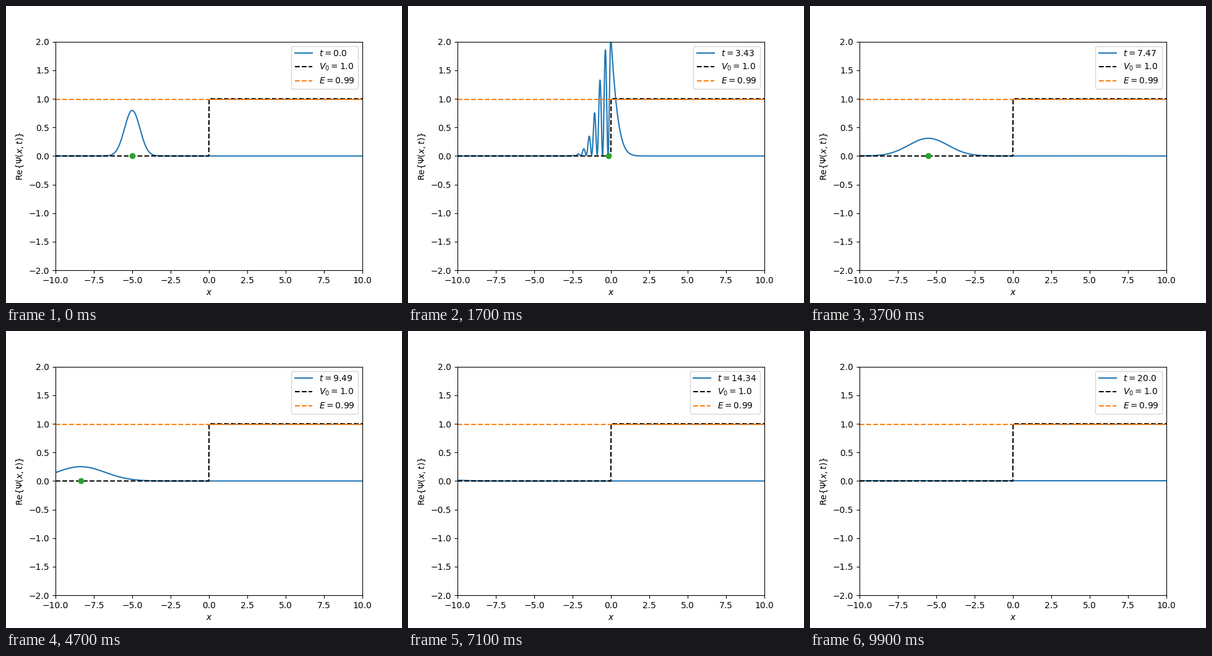
Write a matplotlib script that moves like this. It is 640 px wide and 480 px high and loops after 10000 ms.

```python
import numpy as np
import matplotlib.pyplot as plt
from matplotlib.animation import FuncAnimation

FRAMES = 100
HBAR = 1 / (2 * np.pi)
MASS = 1.0
V0, E = 1.0, 0.99
X0, SIGMA = -5.0, 0.5

speed = np.sqrt(2 * E / MASS)
k = np.sqrt(2 * MASS * E) / HBAR
kappa = np.sqrt(2 * MASS * (V0 - E)) / HBAR
R = (k - 1j * kappa) / (k + 1j * kappa)
T = 2 * k / (k + 1j * kappa)

x = np.linspace(-10, 10, 1000)
times = np.linspace(0, 20, FRAMES)


def envelope(x, t):
    """Amplitude of a free, spreading Gaussian packet."""
    s = SIGMA * np.sqrt(1 + (HBAR * t / (2 * MASS * SIGMA**2)) ** 2)
    d = x - X0 - speed * t
    return np.exp(-(d / (2 * s)) ** 2) / np.sqrt(s * np.sqrt(2 * np.pi))


def density(t):
    incoming = envelope(x, t) * np.exp(1j * k * x)
    reflected = R * envelope(-x, t) * np.exp(-1j * k * x)
    inside = T * envelope(x, t) * np.exp(-kappa * np.maximum(x, 0))
    return np.abs(np.where(x < 0, incoming + reflected, inside)) ** 2


def time_label(t):
    return f"$t={round(float(t), 2)}$"


fig, ax = plt.subplots(figsize=(6.4, 4.8), dpi=100)
wave, = ax.plot(x, density(0), label=time_label(0.0))
ax.plot(x, np.where(x < 0, 0, V0), "k--", label=f"$V_0={V0}$")
ax.plot(x, np.full_like(x, E), "--", color="C1", label=f"$E={E}$")
particle, = ax.plot([X0], [0], "o", color="C2")
ax.set_xlim(-10, 10)
ax.set_ylim(-2, 2)
ax.set_xlabel("$x$")
ax.set_ylabel(r"$\mathrm{Re}\{\Psi(x,t)\}$")
legend = ax.legend(loc="upper right")


def update(i):
    t = times[i]
    wave.set_ydata(density(t))
    particle.set_data([-abs(X0 + speed * t)], [0])
    legend.get_texts()[0].set_text(time_label(t))
    return wave, particle, legend


anim = FuncAnimation(fig, update, frames=FRAMES, interval=100,
                     repeat=True, repeat_delay=0)
plt.show()
```
